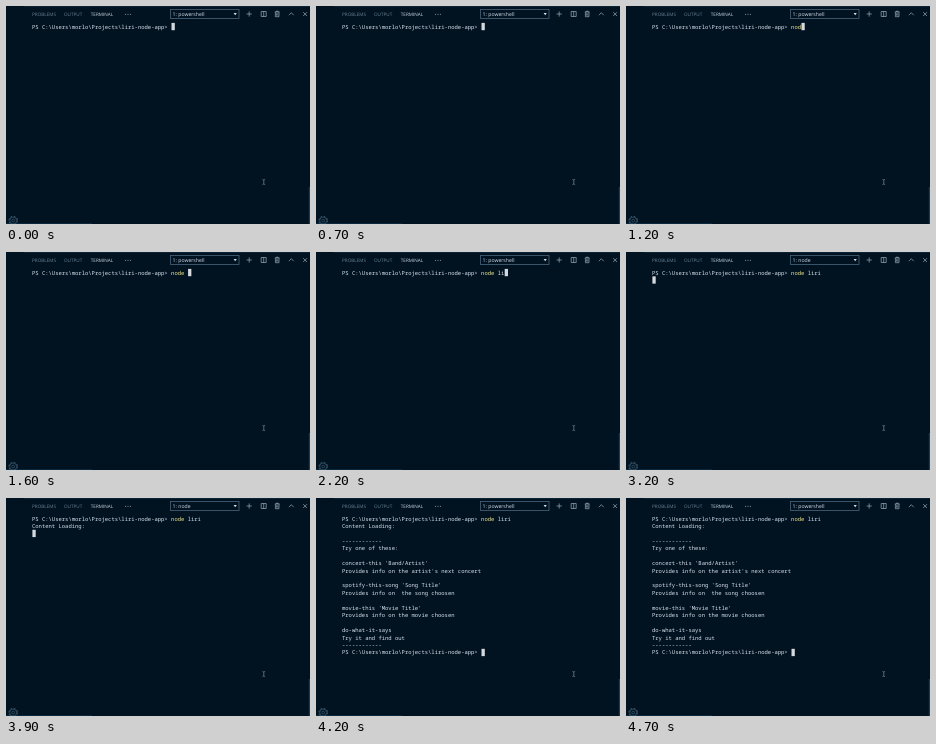
Recreate the animation shown at these times as an HTML page. Size 304x218 px, loop 5 s.

```html
<!DOCTYPE html>
<html lang="en">
<head>
<meta charset="utf-8">
<title>Terminal session</title>
<style>
  html, body { margin: 0; width: 100%; height: 100%; overflow: hidden; background: #011321; }
  svg { display: block; width: 304px; height: 218px; }
  text { white-space: pre; text-rendering: geometricPrecision; }
  .ui { font: 4.63px "Open Sans", "Noto Sans", sans-serif; fill: #6c8496; }
  .ui .on { font-weight: 500; fill: #d2dce6; }
  .ui .pick { font-size: 5.15px; font-weight: 500; fill: #d6deeb; }
  .term { font: 500 5.52px "Noto Sans Mono", "DejaVu Sans Mono", monospace; fill: #dbe3ee; }
  .cmd { fill: #f3ea8c; }
  .icons { fill: none; stroke: #a9b6c2; stroke-width: .65; }
</style>
</head>
<body>
<svg viewBox="0 0 304 218">
  <rect width="304" height="218" fill="#011321"/>
  <path d="M18 .5H304" stroke="#0d283a" stroke-width=".8"/>
  <path d="M0 217.6H86" stroke="#0e3049" stroke-width=".8"/>
  <path d="M303.4 181V218" stroke="#123a60" stroke-width="1.2"/>

  <g class="ui">
    <text x="26" y="9.8">PROBLEMS</text>
    <text x="58" y="9.8">OUTPUT</text>
    <text x="84.8" y="9.8" class="on">TERMINAL</text>
    <g fill="#a9b7c3">
      <circle cx="119.6" cy="8.2" r=".5"/>
      <circle cx="122" cy="8.2" r=".5"/>
      <circle cx="124.4" cy="8.2" r=".5"/>
    </g>
    <rect x="164.5" y="3.5" width="68.5" height="9" fill="#011321" stroke="#48647a" stroke-width=".8"/>
    <text id="shell" x="166.6" y="9.8" class="pick"></text>
    <path d="M227.6 6.9h3.2l-1.6 2.4z" fill="#d6deeb"/>
  </g>

  <g class="icons">
    <path d="M240.6 8h5.2M243.2 5.4v5.2"/>
    <path d="M255.2 5.5h5v5h-5zM257.7 5.5v5"/>
    <path d="M268.8 6h4.8M270.2 6v-.8h2V6M269.4 6.2v4.5h3.6V6.2M270.6 7.3v2.3M271.8 7.3v2.3"/>
    <path d="M282.9 9.2l2.4-2.5 2.4 2.5"/>
    <path d="M297.2 6.2l3.8 3.8M301 6.2l-3.8 3.8"/>
    <path stroke="#8595a3" d="M256.5 173.5q1 0 1.3.5q.3-.5 1.3-.5M257.8 174v4M256.5 178.5q1 0 1.3-.5q.3.5 1.3.5"/>
    <g stroke="#42627a">
      <circle cx="7.2" cy="214.6" r="3.5"/>
      <circle cx="7.2" cy="214.6" r="1.4"/>
      <circle cx="7.2" cy="214.6" r="4.3" stroke-width="1" stroke-dasharray="1.69"/>
    </g>
  </g>

  <g class="term" id="lines"></g>
  <rect id="cursor" width="3.3" height="7.3" fill="#d3d9de"/>
</svg>
<script>
  const LOOP = 5000, LEFT = 26, PITCH = 7.44, ADVANCE = 3.312;
  const PROMPT = "PS C:\\Users\\morlo\\Projects\\liri-node-app> ";
  const COMMAND = "node liri";
  const OUTPUT = [
    "Content Loading:", "",
    "------------", "Try one of these:", "",
    "concert-this 'Band/Artist'", "Provides info on the artist's next concert", "",
    "spotify-this-song 'Song Title'", "Provides info on  the song choosen", "",
    "movie-this 'Movie Title'", "Provides info on the movie choosen", "",
    "do-what-it-says", "Try it and find out",
    "------------", PROMPT
  ];

  // time, typed characters, output lines, cursor row, cursor column, shell name
  const HOME = PROMPT.length;
  const STEPS = [
    ...[0, 1000, 1100, 1200, 1300, 1500, 1900, 2200, 2300, 2500]
      .map((t, n) => [t, n, 0, 0, HOME + n, "powershell"]),
    [3200, 9, 0, 1, 0, "node"],
    [3500, 9, 1, 2, 0, "node"],
    [4200, 9, OUTPUT.length, OUTPUT.length, HOME, "powershell"]
  ];

  const byId = id => document.getElementById(id);
  const shell = byId("shell"), cursor = byId("cursor"), lines = byId("lines");

  function addText(row, str, col = 0, cls = "") {
    const el = document.createElementNS("http://www.w3.org/2000/svg", "text");
    el.setAttribute("x", LEFT + col * ADVANCE);
    el.setAttribute("y", 22.5 + row * PITCH);
    el.setAttribute("class", cls);
    el.textContent = str;
    lines.append(el);
    return el;
  }

  addText(0, PROMPT);
  const program = addText(0, "", HOME, "cmd");
  const argument = addText(0, "", HOME + 5);
  const output = OUTPUT.map((str, i) => addText(i + 1, str));

  let shown;
  function draw(time) {
    const step = STEPS.findLast(s => s[0] <= time);
    if (step === shown) return;
    shown = step;
    const [, typed, count, row, col, name] = step;
    program.textContent = COMMAND.slice(0, Math.min(typed, 4));
    argument.textContent = COMMAND.slice(5, Math.max(typed, 5));
    output.forEach((el, i) => el.setAttribute("visibility", i < count ? "visible" : "hidden"));
    cursor.setAttribute("x", LEFT + .4 + col * ADVANCE);
    cursor.setAttribute("y", 16.9 + row * PITCH);
    shell.textContent = "1: " + name;
  }

  const start = performance.now();
  function tick() {
    draw((performance.now() - start) % LOOP);
    requestAnimationFrame(tick);
  }
  tick();
</script>
</body>
</html>
```
